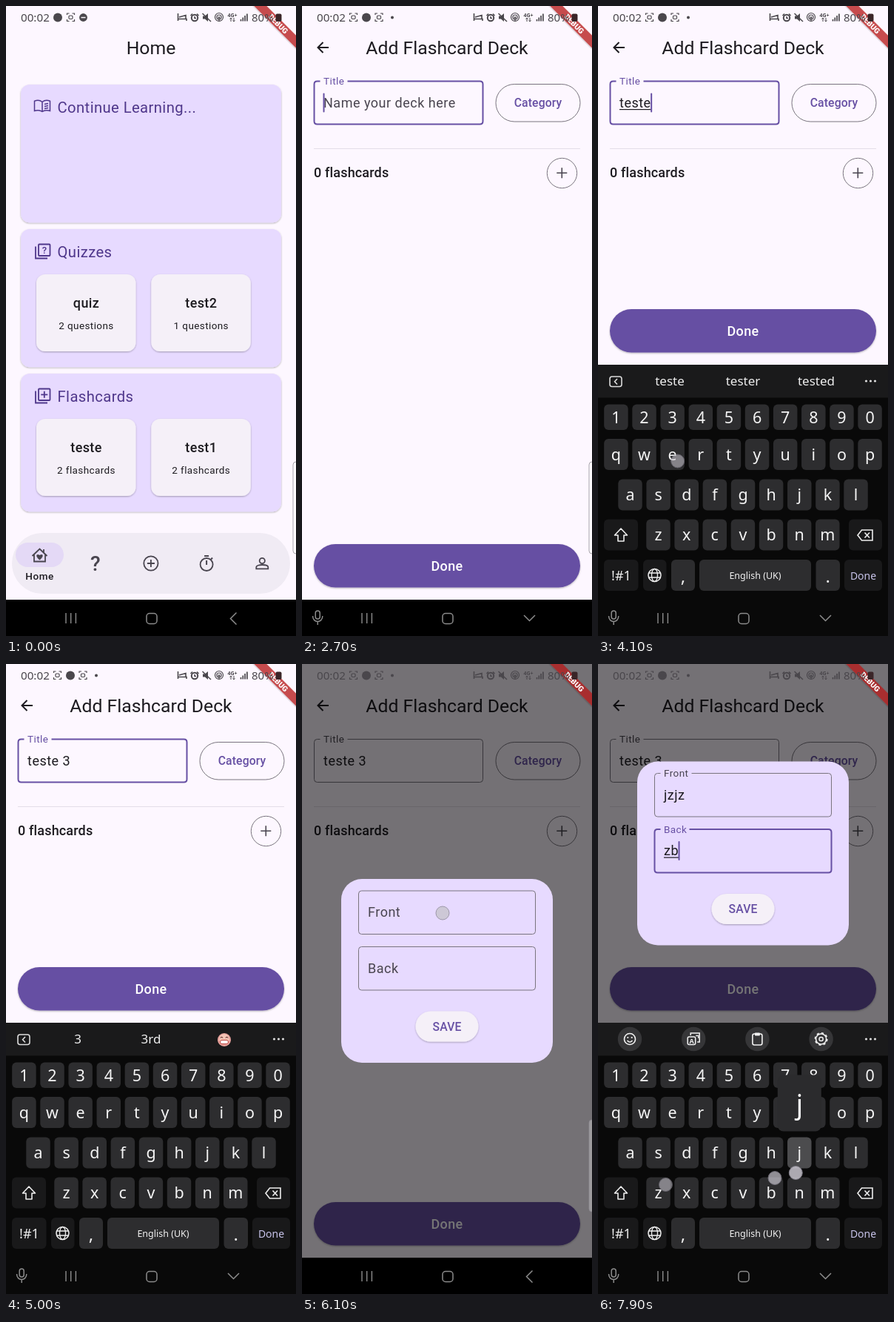
Recreate the animation shown at these times as an HTML page. Size 392x850 px, loop 8000 ms.

```html
<!DOCTYPE html>
<html lang="en">
<head>
<meta charset="utf-8">
<title>Flashcard app</title>
<style>
html, body { margin: 0; width: 100%; height: 100%; overflow: hidden; background: #fdf7ff; }
svg { display: block; width: 100%; height: 100%; font-family: Roboto, sans-serif; }
.sys { font-family: "Noto Sans", sans-serif; }
text { white-space: pre; }
</style>
</head>
<body>
<svg viewBox="0 0 392 850" xmlns="http://www.w3.org/2000/svg">
  <defs>
    <filter id="sh" x="-10%" y="-10%" width="120%" height="125%">
      <feDropShadow dx="0" dy="1" stdDeviation="1" flood-color="#000" flood-opacity=".3"/>
    </filter>
  </defs>
  <g id="stage"></g>
</svg>
<script>
const LOOP = 8000, STEP = 100;
const BG = '#fdf7ff', INK = '#1d1b20', GREY = '#49454f', EDGE = '#79747e';
const PURPLE = '#6750a4', DEEP = '#4f378b', CARD = '#e7daff', TILE = '#f5f0f8';
const stage = document.getElementById('stage');
const pen = document.createElement('canvas').getContext('2d');

const clamp = u => Math.max(0, Math.min(1, u));
const ease = u => (u = clamp(u), u * u * (3 - 2 * u));
const track = (pts, u) => {
  if (u <= pts[0][0]) return pts[0][1];
  for (let i = 1; i < pts.length; i++) {
    const [a, p] = pts[i - 1], [b, q] = pts[i];
    if (u < b) return p + (q - p) * (u - a) / (b - a);
  }
  return pts[pts.length - 1][1];
};

// Drawing helpers, each returns markup
const text = (x, y, s, size, fill = INK, { a = 'start', w = 400, ls = 0, more = '' } = {}) =>
  `<text x="${x}" y="${y}" font-size="${size}" fill="${fill}" text-anchor="${a}" font-weight="${w}" letter-spacing="${ls}" ${more}>${s}</text>`;
const mid = (x, y, s, size, fill, o = {}) => text(x, y, s, size, fill, { a: 'middle', ...o });
const rect = (x, y, w, h, r, fill, more = '') =>
  `<rect x="${x}" y="${y}" width="${w}" height="${h}" rx="${r}" fill="${fill}" ${more}/>`;
const circle = (x, y, r, fill, more = '') => `<circle cx="${x}" cy="${y}" r="${r}" fill="${fill}" ${more}/>`;
const line = (d, color, w = 1.8, more = '') =>
  `<path d="${d}" fill="none" stroke="${color}" stroke-width="${w}" ${more}/>`;
const ring = (x, y, r, color, w = 1.8, more = '') => circle(x, y, r, 'none', `stroke="${color}" stroke-width="${w}" ${more}`);
const box = (x, y, w, h, r, color, sw = 1.5) => rect(x, y, w, h, r, 'none', `stroke="${color}" stroke-width="${sw}"`);
const group = (x, y, body, more = '') => `<g transform="translate(${x} ${y})" ${more}>${body}</g>`;
const SHADOW = 'filter="url(#sh)"';

// Icons, centred on 0,0 unless noted
const plus = (c, n, w = 1.8) => line(`M${-n} 0H${n}M0 ${-n}V${n}`, c, w);
const plusRing = c => ring(0, 0, 9.6, c) + plus(c, 5);
const house = c => line('M-10 1L0 -8.5L10 1M-7.5 -1V8.5H7.5V-1M5.5 -4V-8', c) +
  `<path d="M0 6.5C-7 1 -4 -3 0 0C4 -3 7 1 0 6.5" fill="${c}"/>`;
const timer = c => ring(0, 1.5, 8.5, c) + line('M-3 -10H3M0 -4V2M6 -5.5L8 -7.5', c, 2);
const person = c => ring(0, -3.5, 3.6, c) + line('M-8 7.3V5C-8 1 8 1 8 5V7.3Z', c);
const question = c => mid(0, 10, '?', 28, c, { w: 500 });
const stack = (x, y, glyph, c) => group(x, y,
  line('M1 4V20H17', c) + box(5, 1, 15.5, 15.5, 1, c, 1.8) +
  (glyph === '+' ? group(12.8, 8.8, plus(c, 4.5)) : mid(12.8, 13.5, '?', 13, c, { w: 500 })));
const book = c => line('M0 -5.5C-3 -8 -7 -8 -10.5 -6.8V6.5C-7 5.3 -3 5.3 0 7.5C3 5.3 7 5.3 10.5 6.5V-6.8C7 -8 3 -8 0 -5.5V7.5M3 -2.5L8 -3.5M3 .5L8 -.5M3 3.5L8 2.5', c, 1.5);
const pencil = c => line('M-9 9V5L4 -8L8 -4L-5 9ZM2 -6L6 -2', c);

// App pages
const title = s => mid(196, 65, s, 24.75, INK);
const card = (x, y, w, h) => rect(x, y, w, h, 12, CARD, SHADOW);
const heading = (x, y, s, c) => text(x, y, s, 20.25, c, { ls: .4 });
const tile = (x, y, name, sub) => rect(x, y, 134.5, 104, 12, TILE, SHADOW) +
  mid(x + 67.5, y + 45, name, 18, INK, { w: 500, ls: .35 }) +
  mid(x + 67.5, y + 73.5, sub, 13.5, INK, { ls: .4 });
const tiles = (y, a, an, b, bn) => tile(41, y, a, an) + tile(196.3, y, b, bn);
const decks = y => tiles(y, 'teste', '2 flashcards', 'test1', '2 flashcards');
const quizzes = y => tiles(y, 'quiz', '2 questions', 'test2', '1 questions');

const home = () => title('Home') +
  [106, 301, 496].map(y => card(20, y, 352, 186.3)).join('') +
  group(49, 135, book(DEEP)) + heading(69.5, 143.5, 'Continue Learning...', DEEP) +
  stack(39, 320.5, '?', DEEP) + heading(69.5, 338.5, 'Quizzes', DEEP) + quizzes(362) +
  stack(39, 515.5, '+', DEEP) + heading(69.5, 533.5, 'Flashcards', DEEP) + decks(557);

const note = (x, y, s) => mid(x, y, s, 15.75, '#70677c', { ls: .25 });
const create = t => title('Create') +
  group(28.5, 118.5, plusRing(INK)) + text(49, 127.5, 'Add', 24.75) +
  card(20, 157, 164.5, 166) + card(208, 157, 164.5, 166) +
  (t >= 1400 && t < 1800 ? rect(20, 157, 164.5, 166, 12, INK, 'opacity=".09"') : '') +
  stack(34.5, 173, '+', INK) + heading(65, 191, 'Flashcards', INK) +
  stack(222.5, 173, '?', INK) + heading(253, 191, 'Quiz', INK) +
  note(102, 231, 'Boost your') + note(102, 253.3, 'memory with cards') +
  note(290, 231, 'Test your') + note(290, 253.3, 'knowledge') +
  group(28.5, 369, pencil(INK)) + text(49, 378, 'Edit', 24.75) +
  card(20, 407, 352, 186.3) + heading(37, 445.5, 'My Flashcards', INK) + decks(469) +
  card(20, 618, 352, 186.3) + heading(37, 656, 'My Quizzes', INK) + quizzes(679.5);

function tabs(t) {
  const p = ease((t - 200) / 500);
  const icons = [house, question, plusRing, timer, person];
  return rect(0, 703, 392, 98, 0, BG) + rect(8, 711, 376, 82, 41, '#f0ebf4') + icons.map((icon, i) => {
    const on = i === 0 ? 1 - p : i === 2 ? p : 0, x = 45.5 + i * 75.2;
    return (on ? rect(x - 32.5 * on, 724, 65 * on, 33, 16.5, '#e4d9f6', `opacity="${on}"`) +
      mid(x, 774, i ? 'Create' : 'Home', 13.5, INK, { w: 500, ls: .5, more: `opacity="${on}"` }) : '') +
      group(x, 752 - 11 * on, icon(GREY));
  }).join('');
}

// Outlined input with a notch for the floating label
function field(x, y, w, h, label, gap, { value = '', hint = '', focus, caret, mark }) {
  const up = focus || value, c = focus ? PURPLE : EDGE, r = 4, x2 = x + w, y2 = y + h;
  const g1 = up ? x + 8 : x + r, g2 = up ? x + 16 + gap : x + r;
  const tx = x + 12.5, by = y + 35;
  pen.font = '18px Roboto, sans-serif';
  const width = s => pen.measureText(s).width + s.length * .5;
  let out = line(`M${g2} ${y}H${x2 - r}q${r} 0 ${r} ${r}V${y2 - r}q0 ${r} ${-r} ${r}H${x + r}q${-r} 0 ${-r} ${-r}V${y + r}q0 ${-r} ${r} ${-r}H${g1}`, c, focus ? 2 : 1);
  out += up ? text(tx, y + 4.7, label, 13.5, focus ? PURPLE : GREY, { ls: .4 }) : text(tx, by, label, 18, GREY, { ls: .5 });
  if (focus && !value && hint) out += text(tx, by, hint, 18, GREY, { ls: .5 });
  if (value) out += text(tx, by, value, 18, INK, { ls: .5 });
  if (value && mark) out += rect(tx, by + 2.5, width(value), 1.2, 0, INK);
  if (focus && caret) out += rect(tx + width(value) - .5, y + 16, 2, 26, 1, PURPLE);
  return out;
}

// Keyboard layout
const keys = {};
[['1234567890', 24.4, 537.5, 34.5], ['qwertyuiop', 24.4, 584, 42], ['asdfghjkl', 43.5, 638.5, 42], ['zxcvbnm', 81.5, 692.5, 42]]
  .forEach(([row, x, y, h]) => [...row].forEach((ch, i) => keys[ch] = { x: x + i * 38.13, y, w: 32.5, h }));
keys[' '] = { x: 212.5, y: 747, w: 151, h: 42 };

// Key presses: time, key, finger offset
const presses = [
  [3400, 't'], [3600, 'e'], [3700, 's'], [3900, 't'], [4000, 'e'], [4200, ' '], [4400, '3'],
  [6800, 'j'], [6900, 'z'], [7000, 'j'], [7100, 'z'],
  [7800, 'z', 10, -11], [7850, 'b', 5, -20], [7900, 'j', -5, 27]
];
const taps = [[100, 196, 746], [1400, 100, 250], [2500, 130, 130], [5400, 346, 221], [6100, 190, 336], [7300, 200, 253]];
const FOCUS = { title: 2700, front: 6300, back: 7400 }, OPEN = 5500;
const typed = (t, a, b) => presses.filter(p => p[0] >= a && p[0] < b && t >= p[0] + 50).map(p => p[1]).join('');
function caretOn(t) {
  const resets = [...Object.values(FOCUS), ...presses.map(p => p[0] + (p[0] % STEP ? 50 : STEP))];
  return Math.floor((t - Math.max(0, ...resets.filter(r => r <= t))) / 500) % 2 === 0;
}

const rise = [[0, 366], [100, 150], [200, 9.5], [300, 1], [400, 0]];
const fall = [[0, 0], [100, 83], [200, 240], [300, 340], [400, 366]];
const kbDrop = t => t < OPEN ? track(rise, t - FOCUS.title)
  : t < FOCUS.front ? track(fall, t - OPEN) : track(rise, t - FOCUS.front);
const bottom = t => Math.min(801, 484 + kbDrop(t));

function deck(t) {
  const view = bottom(t - (t >= OPEN && t < FOCUS.front ? 100 : 10));
  const value = typed(t, 3400, 5000), focus = t >= FOCUS.title && t < OPEN;
  return rect(0, 0, 392, 850, 0, BG) + title('Add Flashcard Deck') +
    line('M36 56H21.5M28.5 49L21.5 56L28.5 63', INK, 2) +
    field(16.5, 101.5, 228, 58, 'Title', 29, { value, hint: 'Name your deck here', focus, caret: caretOn(t), mark: t < 4300 }) +
    box(262, 105.5, 114, 50.5, 25.2, EDGE, 1) + mid(319, 136, 'Category', 15.75, PURPLE, { w: 500, ls: .1 }) +
    rect(16, 192, 360, 1, 0, '#e4dee8') + text(16, 231, '0 flashcards', 18, INK, { w: 500, ls: .15 }) +
    circle(351.5, 225.5, 20.2, t >= 5400 && t < 5800 ? '#d9d2dc' : 'none', `stroke="${EDGE}"`) +
    group(351.3, 225.3, plus(GREY, 7, 1.6)) +
    rect(16, view - 75, 360, 58.5, 29.2, '#664fa3', SHADOW) +
    mid(196, view - 39, 'Done', 18, '#fff', { w: 500, ls: .3 });
}

function dialog(t) {
  const a = clamp((t - OPEN + 50) / 100);
  if (!a) return '';
  const y = (27 + bottom(t - (t < FOCUS.front ? 140 : 54))) / 2 - 124;
  const caret = caretOn(t), front = t >= FOCUS.front && t < FOCUS.back, back = t >= FOCUS.back;
  return `<g opacity="${a}">` + rect(0, 0, 392, 850, 0, '#000', 'opacity=".54"') +
    rect(53, y, 286, 248, 28, CARD) +
    field(76.5, y + 16, 239, 58.5, 'Front', 34, { value: typed(t, 6500, 7300), focus: front, caret, mark: front }) +
    field(76.5, y + 91.5, 239, 58.5, 'Back', 31, { value: typed(t, 7500, LOOP), focus: back, caret, mark: back }) +
    rect(153.5, y + 178.5, 85, 41, 20.5, TILE, SHADOW) +
    mid(196, y + 204.5, 'SAVE', 15.75, PURPLE, { w: 500, ls: .1 }) + '</g>';
}

const dots = [-6, 0, 6].map(d => circle(368.5 + d, 506, 1.6, '#ddd')).join('');
const toolIcons = c => [
  ring(0, 0, 7.5, c, 1.6) + circle(-2.7, -2, 1.1, c) + circle(2.7, -2, 1.1, c) + line('M-3.5 2Q0 6 3.5 2', c, 1.5),
  box(-8, -3, 10.5, 10.5, 2, c) + line('M-4 -5V-8H8V4H5', c, 1.5) + mid(-2.7, 6, 'A', 9, c, { w: 600 }) + line('M3 -4.5H6.5V-1', c, 1.3),
  box(-6.5, -7, 13, 15, 2.5, c, 1.6) + rect(-3.5, -8.5, 7, 4, 1, c),
  ring(0, 0, 7, c, 1.6) + ring(0, 0, 8.2, c, 1.6, 'stroke-dasharray="3.2 3.24"') + ring(0, 0, 2.6, c, 1.5)
].map((icon, i) => group(43 + i * 86.2, 506, circle(0, 0, 16.2, '#363638') + icon)).join('');
const emoji = group(295, 507, circle(0, 0, 9, '#e5a09b') + circle(0, -1, 6.8, '#f3c4b5') +
  line('M-5 -2.5Q-3.5 -5 -2 -2.5M2 -2.5Q3.5 -5 5 -2.5', '#5a2a2a', 1.2) + rect(-5.5, .5, 11, 5, 2.5, '#fff', 'stroke="#c0453f"'));

function suggestions(t) {
  const word = (x, s) => mid(x, 512, s, 17, '#eee');
  const words = t >= 7000 ? ['jzjz', 'jazz', 'jizz'.replace('i', 'u')] : ['teste', 'tester', 'tested'];
  return box(16, 500, 16, 13.5, 3, '#ddd', 1.6) + line('M26 503L22.5 506.8L26 510.5', '#ddd', 1.6) +
    (t >= 4500 && t < 7000 ? word(97, '3') + word(196, '3rd') + emoji : words.map((s, i) => word(97 + i * 99, s)).join(''));
}

function keyboard(t) {
  const drop = kbDrop(t);
  if (drop >= 366) return '';
  const active = presses.filter(p => p[0] <= t && t < p[0] + STEP).pop();
  const dark = (x, y, w) => rect(x, y, w, 42, 6, '#19191a');
  const suggest = (t >= 3600 && t < 6000) || (t >= 7200 && t < 7400);
  let out = rect(0, 484, 392, 370, 0, '#090909') + rect(0, 484, 392, 44.5, 0, '#1a1a1b') +
    (suggest ? suggestions(t) : toolIcons('#f2f2f2')) + dots;
  for (const [ch, k] of Object.entries(keys)) {
    out += rect(k.x - k.w / 2, k.y, k.w, k.h, 6, active && active[1] === ch ? '#4c4c4e' : '#2d2d2f');
    out += ch === ' ' ? mid(k.x, 773, 'English (UK)', 12.5, '#f2f2f2') : mid(k.x, k.y + (k.h < 40 ? 25 : 28.5), ch, 21.5, '#f5f5f5');
  }
  out += dark(8, 692.5, 46) + line('M31 705L22.5 714H27V722H35V714H39.5Z', '#eee', 1.6, 'stroke-linejoin="round"') +
    dark(339, 692.5, 45) + line('M351 714L356.5 707H371V721H356.5ZM360.5 710.5L367 717.5M367 710.5L360.5 717.5', '#eee', 1.6) +
    dark(8, 747, 46.5) + mid(31.5, 774.5, '!#1', 18, '#eee') +
    dark(61, 747, 31.5) + group(76.5, 768, ring(0, 0, 8.5, '#eee', 1.5) + '<ellipse rx="4" ry="8.5" fill="none" stroke="#eee" stroke-width="1.3"/>' + line('M-8 -3H8M-8 3H8', '#eee', 1.3)) +
    rect(99, 747, 32, 42, 6, '#2d2d2f') + mid(115, 778, ',', 24, '#eee') +
    rect(294.5, 747, 32.5, 42, 6, '#2d2d2f') + mid(310.8, 778, '.', 24, '#eee') +
    dark(333, 747, 51) + mid(358.5, 773.5, 'Done', 14, '#c6c2e8');
  if (active && active[1] !== ' ') {
    const k = keys[active[1]];
    out += rect(k.x - 29.5, k.y - 84, 59, 76, 8, '#2b2b2d') + mid(k.x, k.y - 32, active[1], 36, '#fff');
  }
  return group(0, drop, out, 'class="sys"');
}

function navigation(t) {
  const open = (t >= FOCUS.title && t < OPEN) || t >= FOCUS.front, c = '#8c8c8c';
  return line('M81 819V833M87.7 819V833M94.4 819V833', c, 1.4) + box(190, 819.5, 14, 14, 4, c) +
    line(open ? 'M300 822L307.5 829.5L315 822' : 'M311.5 818.5L303.5 826.5L311.5 834.5', c, 1.5) +
    (open ? box(18.2, 816, 6, 11, 3, c) + line('M14.5 823C14.5 833 27.8 833 27.8 823M21.2 830.5V835', c, 1.5) : '');
}

const corners = (x, c) => line(`M${x - 5} 12V10H${x - 2}M${x + 2} 10H${x + 5}V12M${x + 5} 18V20.5H${x + 2}M${x - 2} 20.5H${x - 5}V18`, c, 1.2);
function status(t) {
  const c = '#4a474c', lens = x => box(x - 2.5, 13, 5, 4.5, 1.2, c, 1.2);
  let out = text(20, 20.5, '00:02', 15.2, c);
  if (t < 500) out += circle(70, 15.5, 6, c) + corners(87.5, c) + lens(87.5) + circle(104.5, 15.5, 5.4, c) + rect(101.5, 14.8, 6, 1.5, 0, BG);
  else out += corners(69.5, c) + (t % 900 >= 100 && t % 900 < 300 ? '' : lens(69.5)) + circle(87, 15.5, 6, c) +
    corners(104, c) + lens(104) + circle(122, 15.5, 2, c);
  return `<g class="sys">` + out +
    line('M232.5 10V20M232.5 17.5H244V20M234 15L243 12.5V17', c, 1.6) +
    ring(255, 16, 4.2, c, 2) + line('M249.5 13L252 10.5M260.5 13L258 10.5M255 14V16.5H257', c, 1.5) +
    `<path d="M266 13.5H269L273 10V21L269 17.5H266Z" fill="${c}"/>` + line('M265.5 10L277 21', c, 1.5) +
    ring(288, 15, 5.5, c, 1.2) + ring(288, 15, 3, c, 1.2) + circle(288, 15.5, 1.3, c) + line('M288 16V21', c, 1.3) +
    mid(306, 14.5, '4G+', 7, c, { w: 700 }) + line('M304 21V16M302.5 17.5L304 16L305.5 17.5M308 16V21M306.5 19.5L308 21L309.5 19.5', c, 1) +
    line('M317.5 20.5V18M320.3 20.5V15.5M323.1 20.5V13M325.9 20.5V10.5', c, 1.7) +
    text(332, 20.5, '80%', 15, c) + rect(364.5, 10.5, 8, 10.5, 2, '#3a2528') + '</g>';
}

const banner = `<g transform="translate(392 0) rotate(45)">` +
  rect(-42, 28, 84, 12, 0, '#b71c1c', 'opacity=".78" filter="url(#sh)"') +
  mid(0, 37.6, 'DEBUG', 10.2, '#fff', { w: 900 }) + '</g>';

const finger = (x, y, age) => circle(x, y, 9, '#c9c6cf', `stroke="#8f8b98" opacity="${.85 - age / 350}"`);
const fingers = t => [...taps, ...presses.map(([at, ch, dx = 7, dy = 9]) => [at, keys[ch].x + dx, keys[ch].y + 21 + dy])]
  .filter(([at]) => t >= at && t < at + 200).map(([at, x, y]) => finger(x, y, t - at)).join('');

function draw(t) {
  let out = rect(0, 0, 392, 850, 0, BG);
  if (t < 1900) out += (t < 300 ? home() : create(t)) + tabs(t);
  if (t >= 1600) {
    const p = ease((t - 1550) / 350), s = .88 + .12 * p;
    out += `<g opacity="${p}" transform="translate(${196 * (1 - s)} ${425 * (1 - s)}) scale(${s})">${deck(t)}</g>`;
  }
  out += dialog(t) + banner + rect(0, 801, 392, 49, 0, '#000') + keyboard(t) + navigation(t) + status(t);
  if (t < 2800 || (t >= 5700 && t < 6700))
    out += rect(388, 615, 12, 124, 4, '#fff', 'fill-opacity=".3" stroke="#8d8890" stroke-opacity=".75"');
  stage.innerHTML = out + fingers(t);
}

const start = performance.now();
let last = -1;
function frame() {
  const t = Math.floor(((performance.now() - start) % LOOP) / STEP) * STEP;
  if (t !== last) draw(last = t);
  requestAnimationFrame(frame);
}
frame();
</script>
</body>
</html>
```
